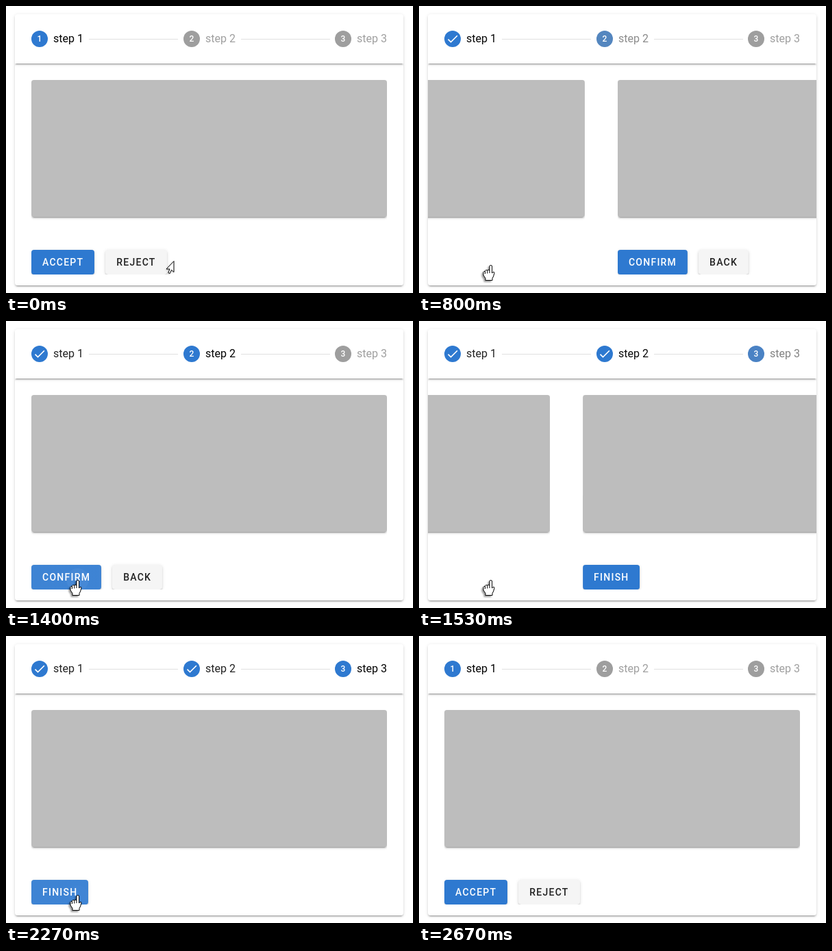
Recreate the animation shown at these times as an HTML page. Size 594 by 419 pixels, loop 3140 ms.

```html
<!DOCTYPE html>
<html lang="en">
<head>
<meta charset="utf-8">
<title>Stepper</title>
<style>
  html, body { margin: 0; width: 100%; height: 100%; overflow: hidden; background: #fff; }
  body { position: relative; font: 16px/24px Roboto, sans-serif; }
  .stepper, header, .card, .btn {
    box-shadow: 0 3px 1px -2px #0003, 0 2px 2px #00000024, 0 1px 5px #0000001f;
  }
  .stepper { position: absolute; left: 13px; top: 12px; width: 567px; height: 396px; border-radius: 4px; overflow: hidden; }
  header { height: 72px; }
  .step { position: absolute; top: 24px; display: flex; }
  .dot { width: 24px; height: 24px; margin-right: 8px; border-radius: 50%; color: #fff; font-size: 12px; font-weight: 500; text-align: center; }
  .dot svg { display: block; margin: 2px; }
  hr { position: absolute; top: 36px; width: 130px; height: 1px; margin: 0; border: 0; background: #e0e0e0; }
  .slide { position: absolute; left: 24px; top: 96px; width: 519px; height: 284px; overflow: hidden; }
  .card { height: 200px; margin-bottom: 48px; border-radius: 4px; background: #bdbdbd; }
  .row { display: flex; gap: 16px; }
  .btn {
    --tint: 255 255 255; --hover: 0;
    position: relative; height: 36px; padding: 0 16px; border-radius: 4px; overflow: hidden;
    font-size: 14px; font-weight: 500; line-height: 36px; letter-spacing: .0892857em; color: #fff;
    background: linear-gradient(rgb(var(--tint) / var(--hover)) 0 100%) #2e79d0;
  }
  .btn.plain { --tint: 0 0 0; color: #000000de; background-color: #f5f5f5; }
  .ripple { position: absolute; border-radius: 50%; background: #fff; opacity: 0; }
  .cursor { position: absolute; left: 0; top: 0; width: 594px; height: 419px; fill: #fff; stroke: #000; stroke-linejoin: round; }
  #hand { filter: drop-shadow(-2px 2px 1px #0006); }
  #arrow { filter: drop-shadow(-1px 1px 1px #0003); }
</style>
</head>
<body>
<div class="stepper"><header></header></div>
<svg class="cursor" viewBox="0 0 594 419">
  <g id="cursor">
    <path id="arrow" d="M0 .5V16.5L-3.5 13.3-5.8 18.5-8.2 17.5-6 12H-11Z"/>
    <path id="hand" d="M-2 8V2Q-2 .5-.2 .5T1.6 2V12L3 10.5Q5 9.5 5 12L3.5 17 2 19.5V22.5H-8V19.5L-11 15V10.5Q-10.5 9-8.5 9.5V8.5Q-7.5 6.8-5.3 7.8-4 6.5-2 8ZM-8.5 9.5V13M-5.3 8V12.5M-2 8V12"/>
  </g>
</svg>
<script>
const LOOP = 3140, FPS = 15, WIDTH = 567;
const BLUE = [46, 121, 208], GREY = [158, 158, 158];
const PRESS = [670, 1385, 2262], MOVE = [733, 1450, 2340], HOVER = [333, 933, 1600];
const CHECK = '<svg width="20" height="20" viewBox="0 0 24 24" fill="#fff"><path d="M21 7 9 19 3.5 13.5 4.91 12.09 9 16.17 19.59 5.59Z"/></svg>';
const $ = id => document.getElementById(id);
const stepper = document.querySelector('.stepper');

const steps = [24, 246, 467].map((x, i) => {
  stepper.insertAdjacentHTML('beforeend',
    `<div class="step" style="left:${x}px"><div class="dot"></div><span>step ${i + 1}</span></div>` +
    (i < 2 ? `<hr style="left:${x + 84}px">` : ''));
  const [dot, label] = stepper.querySelectorAll('.step')[i].children;
  return { dot, label };
});
const slides = [['ACCEPT', 'REJECT'], ['CONFIRM', 'BACK'], ['FINISH']].map(([main, other]) => {
  const el = document.createElement('div');
  el.className = 'slide';
  el.innerHTML = `<div class="card"></div><div class="row"><div class="btn">${main}<i class="ripple"></i></div>` +
    (other ? `<div class="btn plain">${other}</div>` : '') + '</div>';
  stepper.append(el);
  return { el, main: el.querySelector('.btn'), other: el.querySelector('.plain'), ripple: el.querySelector('.ripple') };
});

const clamp = u => Math.min(1, Math.max(0, u));
const mix = (a, b, p) => a + (b - a) * p;
const smooth = u => (u = clamp(u), u * u * (3 - 2 * u));
const bezier = (x1, y1, x2, y2) => u => {
  const at = (a, b, s) => 3 * (1 - s) ** 2 * s * a + 3 * (1 - s) * s * s * b + s ** 3;
  let lo = 0, hi = 1;
  u = clamp(u);
  for (let i = 0; i < 24; i++) {
    const mid = (lo + hi) / 2;
    if (at(x1, x2, mid) < u) lo = mid; else hi = mid;
  }
  return at(y1, y2, (lo + hi) / 2);
};
const swing = bezier(.25, .8, .5, 1);
const fast = bezier(.25, .8, .25, 1);
const standard = bezier(.4, 0, .2, 1);

function drawSteps(t, current) {
  const u = current ? (t - MOVE[current - 1]) / 300 : 1;
  const active = current % 3, previous = current - 1;
  steps.forEach(({ dot, label }, i) => {
    const done = i < active, on = i === active;
    const wasBlue = i <= previous || current === 0 && on;
    const p = wasBlue === (done || on) ? 1 : fast(u);
    const [from, to] = done || on ? [GREY, BLUE] : [BLUE, GREY];
    dot.style.background = `rgb(${from.map((c, k) => mix(c, to[k], p))})`;
    const content = done ? CHECK : String(i + 1);
    if (dot.dataset.content !== content) dot.innerHTML = dot.dataset.content = content;

    let alpha = .38;
    if (on) alpha = mix(current === 3 ? .87 : .38, 1, smooth(u));
    if (done) alpha = i === previous ? mix(1, .87, smooth(u)) : .87;
    label.style.color = `rgba(0,0,0,${alpha})`;
  });
}

function drawSlides(t) {
  const [a, b, c] = MOVE.map(start => swing((t - start) / 300));
  const back = swing((t - MOVE[2] + 3) / 300);
  const offsets = [t < MOVE[1] ? -a : back - 1, t < MOVE[1] ? 1 - a : -b, t < MOVE[2] ? 1 - b : c];
  slides.forEach(({ el, main, ripple }, i) => {
    el.style.transform = `translateX(${offsets[i] * WIDTH}px)`;
    const live = t < MOVE[i] + 400;
    main.style.setProperty('--hover', live ? .08 * smooth((t - HOVER[i]) / 200) : 0);

    // The ripple grows from the pointer towards the button's centre.
    const age = t - PRESS[i], p = standard(age / 250);
    const w = main.offsetWidth, r = Math.hypot(w, 36) / 2 * mix(.3, 1, p);
    const x = mix(68, w / 2, p), y = mix(22, 18, p);
    ripple.style.cssText = `left:${x - r}px;top:${y - r}px;width:${2 * r}px;height:${2 * r}px;` +
      `opacity:${live ? .25 * clamp(age / 100) : 0}`;
  });
  slides[0].other.style.setProperty('--hover', .05 * (smooth((t - 60) / 150) - smooth((t - 240) / 200)));
}

function drawCursor(t) {
  const p = smooth(t / 400), exit = Math.max(0, (t - 2267) / 133);
  const x = mix(245, 105, p) - 9 * exit, y = mix(372, 378, p) + 38 * exit;
  const overButton = exit < .3 && x < 238 && !(x > 131 && x < 147);
  $('cursor').setAttribute('transform', `translate(${x} ${y})`);
  $('hand').style.display = overButton ? '' : 'none';
  $('arrow').style.display = overButton ? 'none' : '';
}

function draw(now) {
  // Motion advances at a fixed rate of 15 poses per second.
  const t = Math.floor((now % LOOP + 5) * FPS / 1000) * 1000 / FPS;
  drawSteps(t, MOVE.filter(start => t >= start).length);
  drawSlides(t);
  drawCursor(t);
}

const begin = performance.now();
function tick() {
  draw(performance.now() - begin);
  requestAnimationFrame(tick);
}
tick();
</script>
</body>
</html>
```
